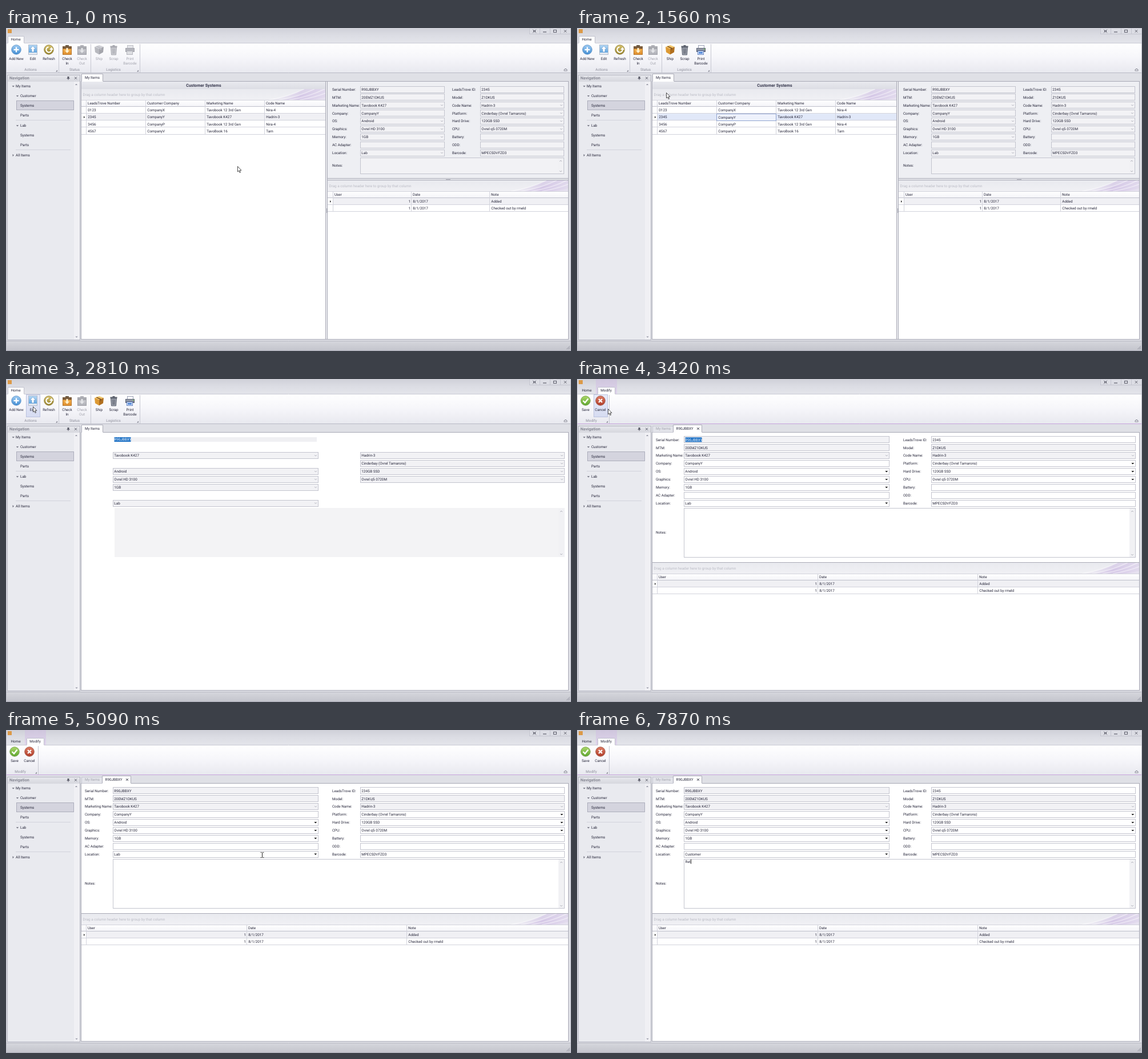
These frames come from a looping animation (989 px wide and 566 px high, 8 s). An HTML page with a canvas:

```html
<!DOCTYPE html>
<html lang="en">
<head>
<meta charset="utf-8">
<title>Inventory</title>
<style>
html, body { margin: 0; width: 100%; height: 100%; overflow: hidden; background: #dfe0e6; }
canvas { display: block; width: 989px; height: 566px; }
</style>
</head>
<body>
<canvas id="stage" width="989" height="566"></canvas>
<script>
const c = document.getElementById('stage').getContext('2d');
const LOOP = 8000, W = 989, H = 566, TAU = Math.PI * 2;
const FONT = 'Roboto, "Liberation Sans", sans-serif';
const INK = '#26263a', DIM = '#a3a4ae', EDGE = '#a9aab6', LINE = '#d2d3dc';

// ---------- drawing helpers ----------
function rect(x, y, x2, y2, fill, edge) {
  if (fill) { c.fillStyle = fill; c.fillRect(x, y, x2 - x, y2 - y); }
  if (edge) { c.strokeStyle = edge; c.lineWidth = 1; c.strokeRect(x + .5, y + .5, x2 - x - 1, y2 - y - 1); }
}
function fade(y, y2, ...cols) {
  const g = c.createLinearGradient(0, y, 0, y2);
  cols.forEach((k, i) => g.addColorStop(i / (cols.length - 1), k));
  return g;
}
function text(s, x, y, col = INK, align = 'left', bold = false) {
  c.font = bold ? `bold 7.2px ${FONT}` : `6.33px ${FONT}`;
  c.textRendering = 'geometricPrecision';
  c.textAlign = align;
  c.fillStyle = col;
  c.fillText(s, x, y + 2.3);
}
function path(pts, fill, edge, lw = 1, closed = true) {
  c.beginPath();
  for (let i = 0; i < pts.length; i += 2) c.lineTo(pts[i], pts[i + 1]);
  if (closed) c.closePath();
  if (fill) { c.fillStyle = fill; c.fill(); }
  if (edge) { c.strokeStyle = edge; c.lineWidth = lw; c.stroke(); }
}
const line = (pts, col, lw) => path(pts, null, col, lw, false);
function disc(x, y, r, fill, edge) {
  c.beginPath(); c.arc(x, y, r, 0, TAU);
  c.fillStyle = fill; c.fill();
  if (edge) { c.strokeStyle = edge; c.lineWidth = .8; c.stroke(); }
}
const down = (x, y, r, col) => path([x - r, y - r / 2, x + r, y - r / 2, x, y + r / 2], col);
const right = (x, y, r, col) => path([x - r / 2, y - r, x + r / 2, y, x - r / 2, y + r], col);
const chevron = (x, y, d, col) => line([x - 2, y - d, x, y + d, x + 2, y - d], col, .8);
function cross(x, y, r, col, lw) {
  line([x - r, y - r, x + r, y + r], col, lw);
  line([x + r, y - r, x - r, y + r], col, lw);
}
function grip(x, y) {
  for (let i = 1; i < 4; i++) line([x - i * 2, y, x, y - i * 2], '#8f909c', .7);
}

// ---------- ribbon icons, centred on (x, 38) ----------
const ball = (x, a, b, edge) => disc(x, 38, 8.3, fade(29, 47, a, b), edge);
const icon = {
  add(x) {
    ball(x, '#a4d0f5', '#3c88d0', '#5a8fc2');
    line([x - 4.5, 38, x + 4.5, 38], '#fff', 2.4); line([x, 33.5, x, 42.5], '#fff', 2.4);
  },
  edit(x) {
    rect(x - 8, 29, x + 8, 47, '#e3e8f0', '#b3bccb');
    rect(x - 7, 30, x + 7, 43, fade(30, 43, '#b4d8f6', '#62a6e0'));
    path([x, 31.5, x + 5, 37, x + 2, 37, x + 2, 42, x - 2, 42, x - 2, 37, x - 5, 37], '#fff', '#5b8fc4', .6);
  },
  refresh(x) {
    ball(x, '#dcc873', '#8f7b25', '#8d7c3c');
    c.beginPath(); c.arc(x, 38, 4.6, -.2, 4.6);
    c.strokeStyle = '#fff'; c.lineWidth = 2.2; c.stroke();
    path([x + 1, 38, x + 8, 38, x + 4.6, 33.5], '#fff');
  },
  box(x, on) {
    rect(x - 3, 30, x + 3, 34, on ? '#6b5a45' : '#b3b4ba');
    rect(x - 8, 32, x + 8, 38, on ? '#7a5c3c' : '#a9aab0');
    rect(x - 8, 36, x + 8, 47, on ? fade(36, 47, '#f6b652', '#dc8a2c') : fade(36, 47, '#cbccd1', '#aeafb6'), on ? '#b5752b' : '#a1a2a9');
    path([x, 44, x + 4, 39.5, x + 1.5, 39.5, x + 1.5, 35, x - 1.5, 35, x - 1.5, 39.5, x - 4, 39.5], on ? '#fff1cf' : '#e4e5e8');
  },
  ship(x, on) {
    path([x, 30, x + 8, 33, x, 36.5, x - 8, 33], on ? '#f3c86c' : '#d0d1d6');
    path([x - 8, 33, x, 36.5, x, 46.5, x - 7, 42.5], on ? '#dd9a34' : '#b8b9bf');
    path([x + 8, 33, x, 36.5, x, 46.5, x + 7, 42.5], on ? '#b06f1f' : '#a4a5ac');
    path([x - 4, 31.5, x + 4, 35, x + 4, 38, x + 1.5, 38.5, x + 1.5, 36, x - 5.5, 32.4], on ? '#8a5a22' : '#bcbdc4');
  },
  scrap(x, on) {
    const k = on ? '#5f6470' : '#a9aab1';
    path([x - 5, 34, x + 5, 34, x + 4, 47, x - 4, 47], on ? '#9a9faa' : '#c9cacf', k, 1);
    for (const d of [-2, 0, 2]) line([x + d, 36, x + d * .8, 45], k, .9);
    rect(x - 6, 31.5, x + 6, 34, k); rect(x - 2, 30, x + 2, 32, k);
  },
  print(x, on) {
    rect(x - 5, 30, x + 6, 37, on ? '#fafbfe' : '#e4e5e9', on ? '#9aa0b4' : '#bdbec5');
    rect(x - 8, 35, x + 8, 42, on ? fade(35, 42, '#a7adbb', '#666d7e') : '#b4b5bc', on ? '#5b6172' : '#a4a5ad');
    rect(x - 6, 40, x + 5, 47, on ? '#eef3fd' : '#dddee2', on ? '#5b7fc4' : '#b4b5bc');
    if (on) { rect(x - 4, 42, x + 3, 45, '#4e86d8'); disc(x + 6, 37, .9, '#79d45a'); }
  },
  save(x) {
    ball(x, '#b0da6c', '#5aa32c', '#6f9a4a');
    line([x - 4.3, 38, x - 1, 41.5, x + 4.5, 34.5], '#fff', 2.4);
  },
  cancel(x) {
    ball(x, '#df8068', '#ae3a26', '#9a4a3a');
    cross(x, 38, 3, '#fff', 2.4);
  }
};

// ---------- window frame ----------
function frame() {
  rect(0, 0, W, H, '#dfe0e6');
  rect(0, 0, W, 26, fade(0, 26, '#cfd0d8', '#dcdde4', '#e3e4ea'));
  rect(3, 2, 10, 9, '#dc9a48');
  for (let i = 0; i < 4; i++) rect(916 + i * 18, 0, 935 + i * 18, 11, '#dcdde4', '#c4c5cf');
  const k = '#5c5d6a';
  cross(925, 5.5, 3, k, .8); rect(923, 4, 927, 7, '#dcdde4', k);
  line([940, 7, 946, 7], k, 1.2); rect(958, 3, 964, 8, null, k); cross(979, 5.5, 2.2, k, 1);
  rect(0, 548, W, H, fade(548, 566, '#d6d7dd', '#c3c4cc'));
  line([0, 548.5, W, 548.5], '#b7b8c2'); line([0, 565.5, W, 565.5], '#a9aab5');
  grip(987, 563);
}
function button(name, x, label, on, hot) {
  if (hot > 0) {
    c.globalAlpha = hot;
    rect(x - 12, 27, x + 13, 67, fade(27, 67, '#e9ecf9', '#d5dbf1'), '#bcc3df');
    c.globalAlpha = 1;
  }
  icon[name](x, on);
  label.split(' / ').forEach((s, i) => text(s, x, 54 + i * 7.4, on ? INK : DIM, 'center'));
}
function group(label, x, end) {
  text(label, x, 73, '#8d8e9a', 'center');
  line([end + .5, 28, end + .5, 78], '#c6c7d1');
  if (label !== 'Status') path([end - 2, 73.5, end - 2, 76.5, end - 5, 76.5], '#7e7f8b');
}
function ribbon(t, edit, live) {
  rect(0, 26, W, 78, fade(26, 78, '#ffffff', '#f6f6fa', '#e8e9ef'));
  line([0, 78.5, W, 78.5], edit ? '#c6a3dc' : '#b9bac5');
  line([0, 26.5, W, 26.5], '#c9cad4');
  if (edit) rect(33, 0, 70, 26, fade(0, 26, '#cfc6dd', '#dfd3ec'));
  const tx = edit ? 36 : 3, te = edit ? 67 : 32;
  rect(tx, 14, te, 28, '#fff');
  line([tx + .5, 26.5, tx + .5, 14.5, te - .5, 14.5, te - .5, 26.5], '#c0c1cc');
  text('Home', 17, 20, INK, 'center');
  line([976.5, 74, 979.5, 71, 982.5, 74], '#5c5d6a', 1); line([976.5, 75, 982.5, 75], '#5c5d6a', .7);
  if (edit) {
    text('Modify', 51, 20, INK, 'center');
    button('save', 15, 'Save', true, 0);
    button('cancel', 41, 'Cancel', true, ramp(t, 2970, 3120) - ramp(t, 3430, 3660));
    return group('Modify', 25, 56);
  }
  button('add', 18, 'Add New', true, 0);
  button('edit', 47, 'Edit', true, ramp(t, 2000, 2200));
  button('refresh', 75, 'Refresh', true, ramp(t, 1790, 1950) - ramp(t, 2000, 2330));
  button('box', 107, 'Check / In', true, 0);
  button('box', 133, 'Check / Out', false, 0);
  button('ship', 163, 'Ship', live, 0);
  button('scrap', 188.5, 'Scrap', live, 0);
  button('print', 217, 'Print / Barcode', live, 0);
  group('Actions', 43, 92); group('Status', 120, 148); group('Logistics', 188, 234);
}
function navigation() {
  rect(2, 82, 130, 547, '#e9eaef', '#b5b6c1');
  rect(3, 83, 129, 94, fade(83, 94, '#e6e7ec', '#d6d7de'));
  text('Navigation', 6, 88, '#878894', 'left', true);
  rect(107.5, 85, 110.5, 88.5, '#5c5d6a'); line([106.5, 88.5, 111.5, 88.5], '#5c5d6a'); line([109, 88, 109, 91], '#5c5d6a');
  cross(122, 87.7, 2, '#5c5d6a', 1);
  rect(119, 94, 129, 546, '#f0f0f4');
  path([121, 100, 125, 100, 123, 97.7], '#9091a0'); down(123.5, 541.5, 2.2, '#9091a0');
  rect(18, 127, 119, 144, '#d4d4de', '#acadbb');
  const items = [['My Items', 17, 102], ['Customer', 25, 119], ['Systems', 25, 136], ['Parts', 25, 153],
    ['Lab', 25, 171], ['Systems', 25, 188], ['Parts', 25, 205], ['All Items', 17, 223]];
  for (const [s, x, y] of items) text(s, x, y);
  down(12.7, 102.3, 2.2, '#6b6c7a'); down(20, 119.3, 2.2, '#6b6c7a'); down(20, 171.3, 2.2, '#6b6c7a');
  right(12.7, 223, 2.2, '#6b6c7a');
  line([17, 161.5, 113, 161.5], '#d2d3db'); line([17, 213.5, 113, 213.5], '#d2d3db');
}
function tabs(edit) {
  rect(131, 93, 985, 546, '#fff', EDGE);
  const x = edit ? 168 : 132, e = edit ? 219 : 170;
  if (edit) rect(132, 82, 169, 94, '#e3e4ea', '#c6c7d1');
  rect(x, 80, e, 95, '#fff');
  line([x + .5, 93.5, x + .5, 80.5, e - .5, 80.5, e - .5, 93.5], EDGE);
  text('My Items', 151, 87, edit ? DIM : INK, 'center');
  if (edit) { text('R90JBBXY', 173.5, 87); cross(212, 87, 2, '#4f505e', 1); }
}

// ---------- grids ----------
function swirl(r, y, h) {
  c.save();
  c.beginPath(); c.rect(r - 105, y, 105, h); c.clip();
  const g = c.createLinearGradient(r - 100, 0, r, 0);
  g.addColorStop(0, 'rgba(216,204,232,0)');
  g.addColorStop(.55, 'rgba(208,192,228,.6)');
  g.addColorStop(1, 'rgba(222,212,236,.5)');
  // a broad soft veil, then thinner folds with pale rims
  for (let i = 0; i < 4; i++) {
    const x = r - 100 + i * 18, wide = i ? 14 : 110;
    c.beginPath();
    c.moveTo(x, y + h);
    c.quadraticCurveTo(x + 32, y + h * .75, x + 62, y);
    c.lineTo(x + 62 + wide, y);
    c.quadraticCurveTo(x + 36 + wide, y + h * .9, x + wide, y + h);
    c.fillStyle = g; c.fill();
    c.beginPath();
    c.moveTo(x, y + h);
    c.quadraticCurveTo(x + 32, y + h * .75, x + 62, y);
    c.strokeStyle = 'rgba(255,255,255,.45)'; c.lineWidth = 1.5; c.stroke();
  }
  c.restore();
}
function grid(y, cols, heads, rows, current, tint, focus) {
  const x = cols[0], end = cols[cols.length - 1], top = y + 19, rh = 12.15;
  rect(x, y, end, top, fade(y, top, '#e9eaef', '#f0f0f4'));
  swirl(end, y, 19);
  text('Drag a column header here to group by that column', x + 2.5, y + 10, '#bbbcc5');
  rect(x, top, end, top + 12, fade(top, top + 12, '#fff', '#f4f4f8'));
  line([x, top + .5, end, top + .5], LINE); line([x, top + 11.5, end, top + 11.5], '#bfc0cb');
  heads.forEach((s, i) => text(s, cols[i + 1] + 2, top + 5.8));
  rows.forEach((row, j) => {
    const ry = top + 12 + j * rh;
    if (j === current) rect(cols[1], ry, end, ry + rh, tint);
    row.forEach((s, i) => {
      if (s === '1') text(s, cols[i + 2] - 2, ry + 6, INK, 'right');
      else text(s, cols[i + 1] + 2.3, ry + 6);
    });
    line([x, Math.round(ry + rh) - .5, end, Math.round(ry + rh) - .5], LINE);
  });
  const bottom = Math.round(top + 12 + rows.length * rh);
  for (const k of cols.slice(1, -1)) line([k - .5, top, k - .5, bottom], LINE);
  right(cols[0] + 5, top + 18 + current * rh, 2, '#222');
  if (focus) {
    rect(cols[2] - 1, top + 24, cols[3], top + 37, '#eef2fc', '#8fa3cf');
    text(rows[1][1], cols[2] + 2.3, top + 30.2);
  }
}
const systems = [
  ['0123', 'CompanyX', 'Tavobook 12 3rd Gen', 'Nira-4'], ['2345', 'CompanyY', 'Tavobook K427', 'Hadrin-3'],
  ['3456', 'CompanyP', 'Tavobook 12 3rd Gen', 'Nira-4'], ['4567', 'CompanyV', 'TavoBook 16', 'Tarn']];
const history = [['1', '8/1/2017', 'Added'], ['1', '8/1/2017', 'Checked out by rmeld']];
const log = (y, cols) => grid(y, cols, ['User', 'Date', 'Note'], history, 0, '#f0f0f4');

// ---------- form; kinds: r read-only, R read-only list, e edit, c list ----------
const fields = [
  ['Serial Number', 'R90JBBXY', 'r', 'LeadsTrove ID', '2345', 'e'],
  ['MTM', '20EMZ1DKUS', 'r', 'Model', 'Z1DKUS', 'r'],
  ['Marketing Name', 'Tavobook K427', 'R', 'Code Name', 'Hadrin-3', 'R'],
  ['Company', 'CompanyY', 'e', 'Platform', 'Cinderbay (Ovrel Tamarons)', 'c'],
  ['OS', 'Android', 'c', 'Hard Drive', '120GB SSD', 'c'],
  ['Graphics', 'Ovrel HD 3100', 'c', 'CPU', 'Ovrel q5-3720M', 'c'],
  ['Memory', '1GB', 'c', 'Battery', '', 'e'],
  ['AC Adapter', '', 'e', 'ODD', '', 'e'],
  ['Location', 'Lab', 'c', 'Barcode', 'MPECSDVFZD3', 'e']];
const isList = kind => kind === 'c' || kind === 'R';
function field(x, e, y, value, kind, locked) {
  const off = locked || kind === 'r' || kind === 'R', t = Math.round(y - 6);
  rect(x, t, e, t + 12, off ? '#f2f2f5' : '#fff', '#c3c4ce');
  if (isList(kind)) off ? chevron(e - 5, y, .8, '#a9aab4') : down(e - 5.2, y + .3, 2.4, '#111');
  text(value, x + 2.3, y);
}
function notes(x, y, e, b, fill, edge) {
  rect(x, y, e, b, fill, edge);
  rect(e - 11, y + 1, e - 1, b - 1, '#f1f1f4');
  chevron(e - 6, y + 6, -.9, '#a3a4ae'); chevron(e - 6, b - 5, .9, '#a3a4ae');
}
function form(y0, lx, fx, fe, locked, place = 'Lab') {
  fields.forEach((f, i) => {
    const y = y0 + i * 13.9;
    for (const k of [0, 1]) {
      const [label, value, kind] = f.slice(k * 3);
      text(label + ':', lx[k], y);
      field(fx[k], fe[k], y, label === 'Location' ? place : value, kind, locked);
    }
  });
}

// ---------- content views ----------
function listView(live) {
  tabs(false);
  rect(132, 94, 560, 107, fade(94, 107, '#e9eaef', '#dcdde4'));
  text('Customer Systems', 346, 101, '#33344a', 'center', true);
  line([132, 107.5, 560, 107.5], LINE);
  grid(107, [132, 141, 245, 349, 453, 560], ['LeadsTrove Number', 'Customer Company', 'Marketing Name', 'Code Name'],
    systems, 1, live ? '#e1e8f8' : '#f0f0f4', live);
  rect(560, 94, 563, 545, '#e9eaee');
  line([559.5, 94, 559.5, 545], EDGE); line([562.5, 94, 562.5, 545], EDGE);
  rect(561, 316, 562, 324, '#a3a4ae');
  rect(563, 94, 984, 264, '#eeeff3');
  form(107.5, [571, 781], [620, 830], [768, 977], true);
  text('Notes:', 571, 241);
  notes(620, 227, 977, 256, '#f2f2f5', '#c3c4ce');
  rect(563, 263, 984, 267, '#e9eaee'); line([563, 263.5, 984, 263.5], EDGE); line([563, 266.5, 984, 266.5], EDGE);
  rect(770, 265, 778, 266, '#a3a4ae');
  log(267, [563, 573, 710, 847, 984]);
}
function marked(y) {
  rect(189.5, y - 4, 218.5, y + 4, '#1a6fc4');
  text('R90JBBXY', 189.3, y, '#fff');
}
function loadingView() {
  tabs(false);
  rect(190, 102, 544, 110, '#f0f0f3');
  marked(106);
  fields.forEach((f, i) => {
    const y = 106.3 + i * 13.9;
    if (isList(f[2])) field(187, 547, y, f[1], 'R');
    if (isList(f[5])) field(620, 978, y, f[4], 'R');
  });
  notes(190, 226, 978, 312, '#f3f3f5');
}
function editView(t) {
  tabs(true);
  const place = t >= 7020 ? 'Customer' : 'Lab';
  form(106.3, [138, 571], [187, 620], [547, 978], false, place);
  text('Notes:', 138, 269);
  notes(187, 226, 978, 313, '#fff', '#c3c4ce');
  line([132, 321.5, 984, 321.5], EDGE);
  log(322, [132, 141, 422, 702, 984]);
  if (t < 4460) marked(106.3);

  const typed = 'Ret'.slice(0, t < 7650 ? 0 : t < 7800 ? 1 : t < 7870 ? 2 : 3);
  text(typed, 189.5, 230.3);
  const inNotes = t >= 7500;
  if (inNotes || (t >= 4460 && (t - 4460) % 1060 < 530)) {
    const s = inNotes ? typed : place, y = inNotes ? 226.5 : 213.5;
    const x = Math.round(189.5 + c.measureText(s).width) + .5;
    line([x, y, x, y + 8], '#111', .9);
  }
  if (t >= 5610 && t < 7090) {
    rect(536, 212, 547, 224, '#dfe1ea', '#a9abbb');
    down(541.5, 217.8, 2.4, '#111');
  }
  if (t >= 6010 && t < 7020) dropdown(t >= 6390 ? 0 : 2);
}
function dropdown(hot) {
  rect(190, 226, 549, 300, 'rgba(60,60,80,.35)');
  rect(187, 223, 547, 299, '#fff', '#9a9bab');
  ['Customer', 'Escalation', 'Lab', 'Vendor'].forEach((s, i) => {
    const y = 228.8 + i * 8.6;
    if (i === hot) rect(188, y - 4.3, 546, y + 4.3, '#f0f0f3', '#e3e3e9');
    text(s, 189.8, y);
  });
  rect(188, 285, 546, 298, '#e9eaef');
  cross(195, 291, 1.9, '#111', 1.4);
  grip(545, 297);
}

// ---------- pointer ----------
const ramp = (t, a, b) => Math.min(1, Math.max(0, (t - a) / (b - a)));
const out = p => u => 1 - (1 - u) ** p;
const inOut = u => u < .5 ? 4 * u ** 3 : 1 - 4 * (1 - u) ** 3;
// start, end, steps, x, y, easing of x, easing of y
const moves = [
  [70, 470, 6, 334, 158, out(1.6)],
  [1320, 2100, 11, 43, 47, out(2.1), out(1.15)],
  [2180, 2330, 3, 47, 48, out(1)],
  [3350, 4130, 11, 321, 231, inOut],
  [4220, 4300, 2, 321, 220, out(1)],
  [4770, 5550, 11, 530, 219, out(1.55)],
  [5610, 5840, 4, 539, 215, out(1.5)],
  [6160, 6620, 7, 507, 228, out(2.9), out(2.1)],
  [7320, 7480, 3, 504, 246, out(1.5)]];
function pointer(t) {
  if (t >= 7650) return;
  let x = 405, y = 242;
  for (const [a, b, n, tx, ty, ex, ey = ex] of moves) {
    if (t < a) break;
    // the pointer is sampled in n steps; the slack absorbs uneven step lengths
    const u = Math.min(n, Math.floor((t - a) / (b - a) * (n - 1) + 1.2)) / n;
    x += (tx - x) * ex(u); y += (ty - y) * ey(u);
  }
  const beam = (t >= 3350 && t < 5610 && x > 188) || t >= 7020;
  x = Math.round(x); y = Math.round(y);
  if (beam) {
    const k = x + .5;
    line([k - 3, y - 4.5, k - .8, y - 4.5, k, y - 3.5, k + .8, y - 4.5, k + 3, y - 4.5], '#222', .8);
    line([k - 3, y + 4.5, k - .8, y + 4.5, k, y + 3.5, k + .8, y + 4.5, k + 3, y + 4.5], '#222', .8);
    line([k, y - 4, k, y + 4], '#222', 1);
  } else {
    c.save(); c.translate(x + .5, y + .5);
    path([0, 0, 0, 9.4, 2.1, 7.5, 3.6, 11, 5, 10.4, 3.6, 7, 6.4, 6.8], '#fff', '#222', .8);
    c.restore();
  }
}

function draw(t) {
  const edit = t >= 2890, live = t >= 620;
  frame();
  ribbon(t, edit, live);
  navigation();
  if (edit) editView(t);
  else if (t >= 2730) loadingView();
  else if (t >= 2640) tabs(false);
  else listView(live);
  line([.5, 0, .5, H], '#b9bac5'); line([988.5, 0, 988.5, H], '#b9bac5');
  pointer(t);
}
const start = performance.now();
function tick() {
  draw((performance.now() - start) % LOOP);
  requestAnimationFrame(tick);
}
tick();
</script>
</body>
</html>
```
